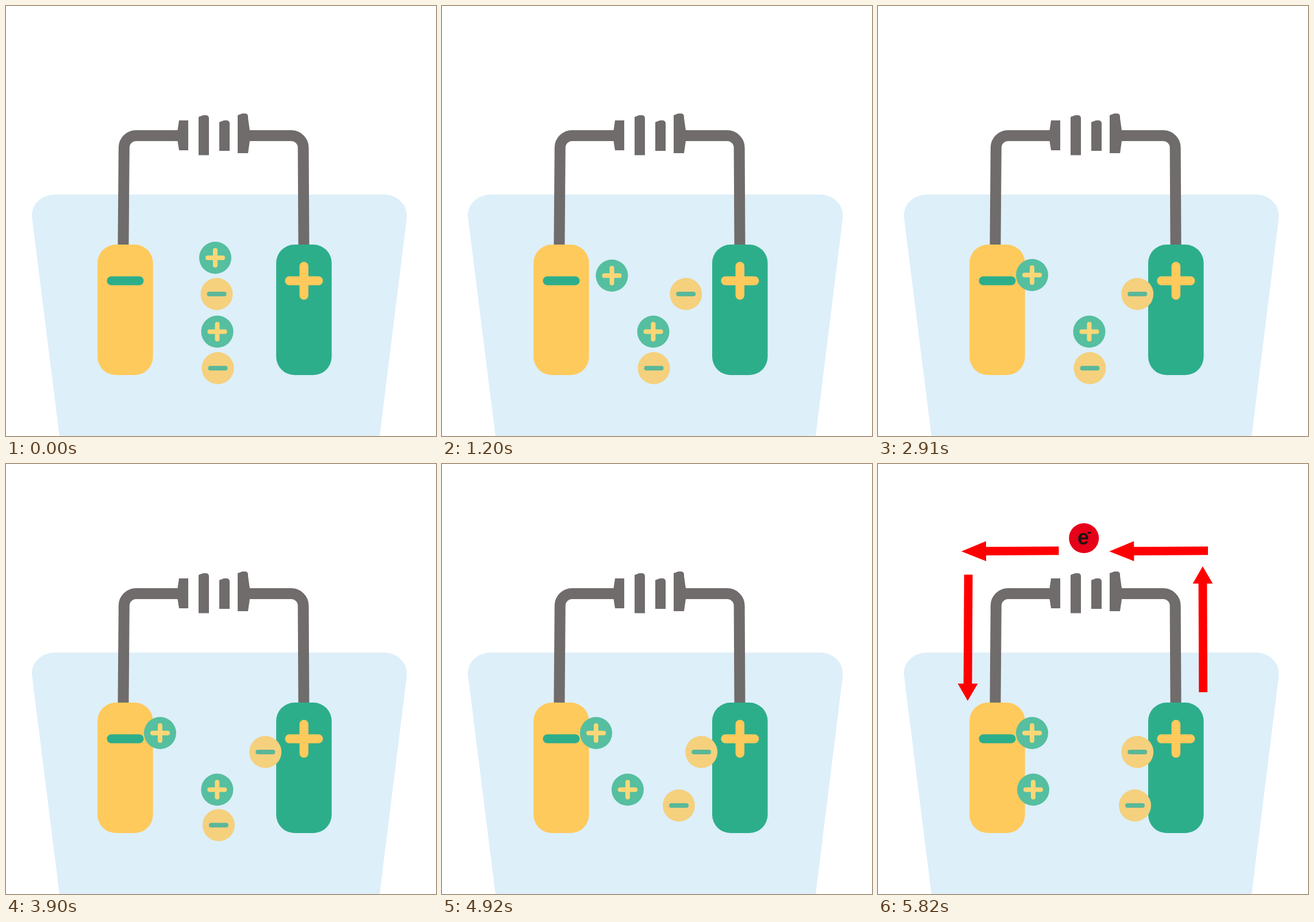
An HTML page with a canvas that plays this animation: 748x748 px, repeating every 7200 ms.

```html
<!DOCTYPE html>
<html lang="en">
<head>
<meta charset="utf-8">
<title>Electrolysis</title>
<style>
html, body { margin: 0; width: 100%; height: 100%; overflow: hidden; background: #fff; }
canvas { display: block; }
</style>
</head>
<body>
<canvas id="stage" width="748" height="748"></canvas>
<script>
const ctx = document.getElementById('stage').getContext('2d');
const SIZE = 748, LOOP = 7200, STEP = 30;
const GREEN = '#2dae8b', YELLOW = '#ffca5c', GREY = '#706c6b';

const clamp = v => Math.max(0, Math.min(1, v));
const easeOut = p => 1 - (1 - clamp(p)) ** 5;
const mix = (a, b, k) => a + (b - a) * k;

// A move covers one straight leg; ease maps its progress.
const move = (x, y, time, ease = p => p) => ({ x, y, time, ease });

const ions = [
  { plus: true, x: 364, y: 438, begin: 0,
    moves: [move(310, 450, 750), move(295.5, 469, 450), move(268, 468, 750)] },
  { plus: false, x: 366.5, y: 501, begin: 0,
    moves: [move(451.2, 501, 1950, p => 1 - (1 - p) ** 1.2)] },
  { plus: true, x: 367.5, y: 566.5, begin: 3870,
    moves: [move(270, 566.5, 1740, p => p ** 1.55)] },
  { plus: false, x: 368.5, y: 630, begin: 3870,
    moves: [move(396, 594, 600), move(447, 594, 1230, p => p ** 1.15)] }
];

function place({ x, y, begin, moves }, t) {
  for (const leg of moves) {
    const k = leg.ease(clamp((t - begin) / leg.time));
    x = mix(x, leg.x, k);
    y = mix(y, leg.y, k);
    begin += leg.time;
  }
  return [x, y];
}

function box(x, y, w, h, r, color) {
  ctx.fillStyle = color;
  ctx.beginPath();
  ctx.roundRect(x, y, w, h, r);
  ctx.fill();
}

function disc(x, y, r, color) {
  ctx.fillStyle = color;
  ctx.beginPath();
  ctx.arc(x, y, r, 0, Math.PI * 2);
  ctx.fill();
}

function sign(x, y, length, weight, plus, color) {
  box(x - length / 2, y - weight / 2, length, weight, weight / 2, color);
  if (plus) box(x - weight / 2, y - length / 2, weight, length, weight / 2, color);
}

function drawBath() {
  ctx.fillStyle = '#ddeff9';
  ctx.fill(new Path2D('M93 748 L45.5 370 C42 347 60 328 86 328 H657 C682 328 700 347 697 370 L650 748 Z'));
}

function wire(x, topX, endX) {
  ctx.beginPath();
  ctx.moveTo(x, 416);
  ctx.arcTo(topX, 225.5, endX, 225.5, 21);
  ctx.lineTo(endX, 225.5);
  ctx.stroke();
}

// Battery plate: slanted top with one rounded corner, optionally flared to a wire.
function plate(x, top, bottom) {
  ctx.beginPath();
  ctx.moveTo(x, top + 3);
  ctx.lineTo(x + 8, top);
  ctx.arcTo(x + 18, top, x + 18, bottom, 5);
  ctx.lineTo(x + 18, bottom);
  ctx.lineTo(x, bottom);
  ctx.fill();
}

function drawCircuit() {
  ctx.fillStyle = ctx.strokeStyle = GREY;
  ctx.lineWidth = 19;
  wire(204, 205.5, 302);
  wire(518, 517, 420);
  plate(335, 190, 259.5);
  plate(371, 199, 252);
  plate(403, 187, 256);
  ctx.fill(new Path2D('M301 199 H317 V251 H301 L298.5 235 V216 Z M421 195 L424 216 V235 L421 256 Z'));
}

function electrode(x, color, mark, plus) {
  box(x, 415, 96.5, 227, 32, color);
  sign(x + 48.3, 478, plus ? 66 : 64, 15.5, plus, mark);
}

function drawIon(ion, t) {
  const [x, y] = place(ion, t);
  disc(x, y, 28, ion.plus ? '#55bfa0' : '#f5d07d');
  sign(x, y, 34, 8, ion.plus, ion.plus ? '#fbd777' : '#5ab899');
}

function arrow(tailX, tailY, tipX, tipY, head) {
  const length = Math.hypot(tipX - tailX, tipY - tailY), neck = length - head;
  ctx.save();
  ctx.translate(tailX, tailY);
  ctx.rotate(Math.atan2(tipY - tailY, tipX - tailX));
  ctx.fillStyle = '#ff0000';
  ctx.fillRect(0, -7.4, neck + 1, 14.8);
  ctx.beginPath();
  ctx.moveTo(neck, -17.4);
  ctx.lineTo(length, 0);
  ctx.lineTo(neck, 17.4);
  ctx.fill();
  ctx.restore();
}

function text(s, size, x, y) {
  ctx.font = `bold ${size}px "Liberation Sans", Arial, sans-serif`;
  ctx.fillText(s, x, y);
}

function drawCurrent(alpha) {
  ctx.globalAlpha = alpha;
  arrow(565.6, 397, 564.8, 178, 30);
  arrow(574, 150.8, 402.3, 152, 43);
  arrow(314.5, 150.8, 145, 152, 43);
  arrow(157.2, 192.5, 156, 412, 30);
  disc(358.2, 129, 26, '#e60019');
  ctx.fillStyle = '#1c1414';
  ctx.textAlign = 'center';
  text('e', 36, 357, 140);
  text('-', 24, 367.5, 126);
  ctx.globalAlpha = 1;
}

function currentAlpha(t) {
  const first = easeOut((t - 1740) / 450) * clamp((2910 - t) / 390);
  return Math.max(first, easeOut((t - 5370) / 450));
}

function draw(t) {
  ctx.clearRect(0, 0, SIZE, SIZE);
  drawBath();
  drawCircuit();
  electrode(159.2, YELLOW, GREEN, false);
  electrode(470, GREEN, YELLOW, true);
  ions.forEach(ion => drawIon(ion, t));
  drawCurrent(currentAlpha(t));
}

const start = performance.now();
function tick() {
  const t = (performance.now() - start) % LOOP;
  draw(Math.floor(t / STEP) * STEP);
  requestAnimationFrame(tick);
}
tick();
</script>
</body>
</html>
```
